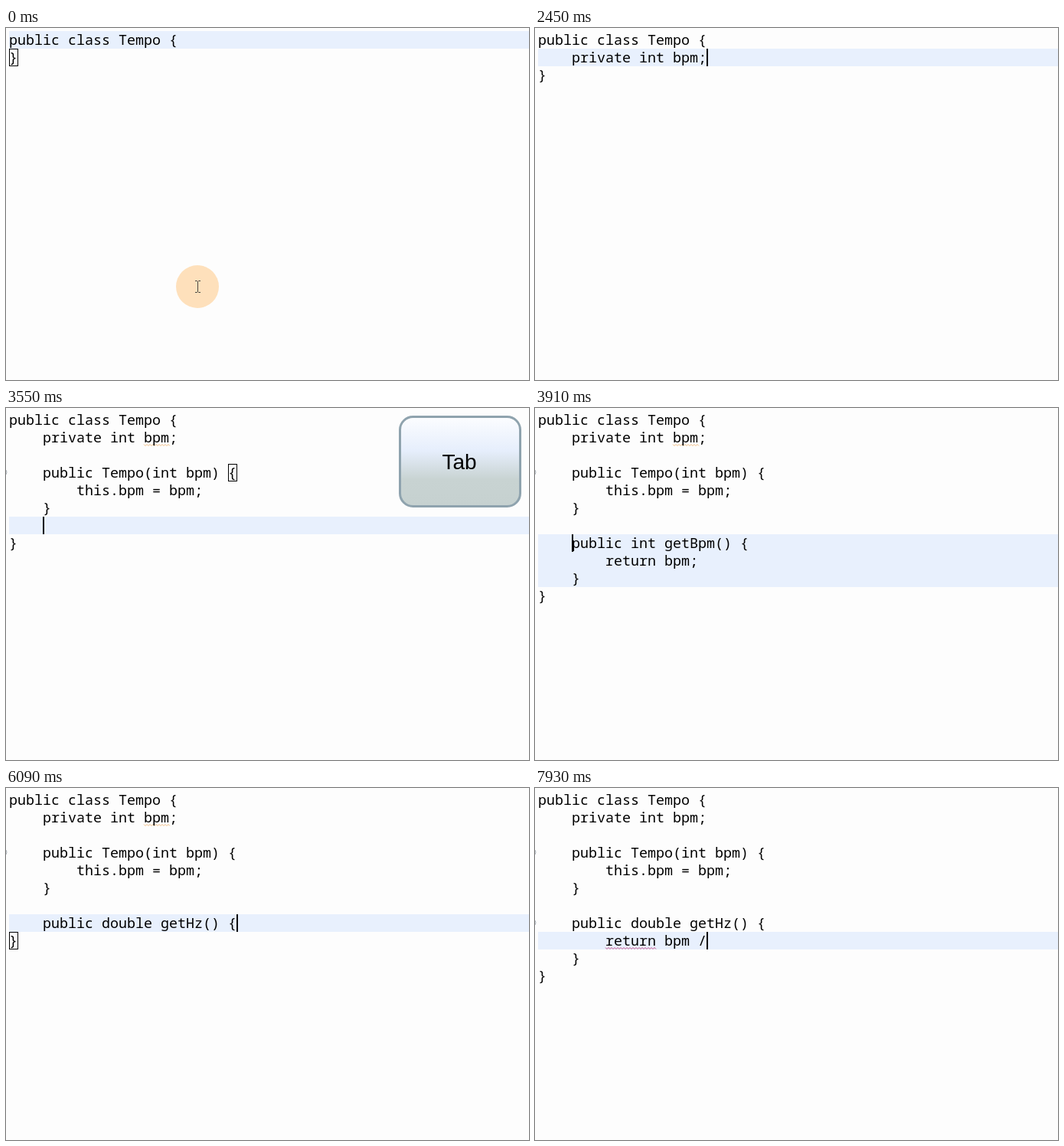
An HTML page that plays this animation: 683x460 px, repeating every 8000 ms.

```html
<!DOCTYPE html>
<html lang="en">
<head>
<meta charset="utf-8">
<title>Code completion</title>
<style>
  html, body { margin: 0; width: 100%; height: 100%; overflow: hidden; background: #fdfdfd; }
  svg { display: block; width: 683px; height: 460px; }
  .code { font: 18.3333px "Noto Sans Mono", "DejaVu Sans Mono", monospace; white-space: pre; }
  .code .key { font-weight: 700; fill: #12000a; }
  .code .field { fill: #1408c8; }
  .code .ghost { fill: #8f9ca6; }
  .key-label { font: 28px "Liberation Sans", Arial, sans-serif; text-anchor: middle; }
</style>
</head>
<body>
<svg viewBox="0 0 683 460">
  <defs>
    <linearGradient id="cap" x1="0" y1="0" x2="0" y2="1">
      <stop offset="0" stop-color="#fcfdff"/>
      <stop offset=".38" stop-color="#e6eefc"/>
      <stop offset=".7" stop-color="#c8d3d2"/>
      <stop offset="1" stop-color="#c6d1d0"/>
    </linearGradient>
  </defs>
  <g id="page"></g>
  <g id="pointer">
    <circle cx="250" cy="338" r="28" fill="#fee0bb"/>
    <path d="M247 330.5h2.5l1 1 1-1h2.5M250.5 331v14M247 345.5h2.5l1-1 1 1h2.5" fill="none" stroke="#4a4641"/>
  </g>
  <g id="keycap">
    <rect x="514.5" y="11.5" width="157" height="117" rx="17" fill="url(#cap)" stroke="#8fa3ae" stroke-width="3"/>
    <text class="key-label" x="592" y="80">Tab</text>
  </g>
</svg>
<script>
const LOOP = 8000, LEFT = 4, TOP = 4, COL = 11, ROW = 23;
const HEAD = 'public class Tempo {';
const FIELD = HEAD + '\n    private int bpm;';
const CTOR = 'public Tempo(int bpm) {\n        this.bpm = bpm;\n    }';
const MAIN = 'public static void main(String[] args) {\n    }';
const GETTER = 'public int getBpm() {\n        return bpm;\n    }';
const BUILT = FIELD + '\n\n    ' + CTOR;
const METHOD = BUILT + '\n\n    ';
const BODY = METHOD + 'public double getHz() {\n        ';

const steps = [];
// Options hold from one step to the next until they are changed.
let options = { caret: true, tail: '\n}', folds: [] };
function step(time, text, ghost = '', change = {}) {
  options = { ...options, ...change };
  steps.push({ time, text, ghost, ...options });
}
// Types a line in parts, one every 120 ms, on top of what is there.
function type(start, base, parts) {
  parts.forEach((part, i) => step(start + i * 120, base += part));
  return base;
}
// Types the first letters of a suggestion whose rest stays grey.
function suggest(start, base, full, counts) {
  counts.forEach((n, i) => step(start + i * 120, base + full.slice(0, n), full.slice(n)));
}

step(0, HEAD, '', { caret: false, pointer: true, bracket: [1, 0] });
step(120, HEAD, '', { caret: true });
step(490, HEAD, '', { caret: false });
let line = HEAD + '\n    ';
step(740, line, '', { caret: true, pointer: false, bracket: null });
suggest(990, line, MAIN, [0, 1]);
line = type(1230, line + 'p', ['r', 'i', 'v']);
line = type(1720, line, ['ate', ' i', 'nt', ' b', 'pm']);
step(2450, FIELD);

step(2700, FIELD + '\n');
step(2820, FIELD + '\n\n    ');
options = { ...options, field: true, warn: true };
suggest(2940, FIELD + '\n\n    ', CTOR, [0, 1, 2]);
step(3300, BUILT, '', { bracket: [3, 26], keycap: true, folds: [3] });
step(3550, BUILT + '\n    ');
step(3670, METHOD, '', { bracket: null });
step(3790, METHOD, '', { keycap: false });
suggest(3910, METHOD, GETTER, [0, 1]);
suggest(4400, METHOD, GETTER, [2, 3, 4, 6, 7]);
line = type(5000, METHOD + 'public ', ['d', 'ou', 'bl', 'e ', 'g']);
line = type(5730, line, ['et', 'Hz', '()']);
step(6090, line + ' {', '', { bracket: [8, 0] });
step(6340, BODY, '', { bracket: null, tail: '\n    }\n}' });
options = { ...options, warn: false, folds: [3, 7] };
line = type(6590, BODY, ['r', 'et', 'ur', 'n']);
options = { ...options, error: true };
line = type(7320, line, [' ', 'b', 'pm']);
type(7810, line, [' ', '/']);

const page = document.getElementById('page');
const pointer = document.getElementById('pointer');
const keycap = document.getElementById('keycap');
const colX = c => LEFT + c * COL;
const rowY = r => TOP + r * ROW;
const TOKEN = /\b(?:public|class|private|int|static|void|this|double|return)\b|[\w]+|[^\w\s]+/g;

function add(tag, attrs, text) {
  const node = document.createElementNS('http://www.w3.org/2000/svg', tag);
  for (const name in attrs) node.setAttribute(name, attrs[name]);
  if (text) node.textContent = text;
  page.appendChild(node);
}
const box = (x, y, width, height, more) => add('rect', { x, y, width, height, ...more });
const word = (text, col, row, kind) =>
  add('text', { x: colX(col), y: rowY(row) + 18, class: 'code ' + kind }, text);

function drawCode(text, field, row, col) {
  for (const part of text.split('\n')) {
    for (const m of part.matchAll(TOKEN)) {
      const t = m[0];
      const isKey = /^(public|class|private|int|static|void|this|double|return)$/.test(t);
      const isField = field && t === 'bpm' && (row === 1 || part.slice(0, m.index).endsWith('this.'));
      word(t, col + m.index, row, isKey ? 'key' : isField ? 'field' : '');
    }
    row++;
    col = 0;
  }
}
function drawGhost(text, row, col) {
  for (const part of text.split('\n')) {
    word(part, col, row++, 'ghost');
    col = 0;
  }
}
function wave(row, col, count, stroke) {
  const y = rowY(row) + 20.5;
  let d = `M${colX(col)} ${y}`;
  for (let i = 0; i < count * COL / 2; i++) d += `l2 ${i % 2 ? -2 : 2}`;
  add('path', { d, fill: 'none', stroke, 'stroke-width': 1 });
}

function draw(s) {
  page.replaceChildren();
  const rows = s.text.split('\n');
  const row = rows.length - 1, col = rows[row].length;
  const extra = s.ghost.split('\n').length - 1;
  box(LEFT, rowY(row), 683 - LEFT, ROW * (extra + 1), { fill: '#e8f0fd' });
  if (s.warn) wave(1, 16, 3, '#f2bd83');
  if (s.error) wave(8, 8, 6, '#c2508c');
  drawCode(s.text, s.field, 0, 0);
  if (s.ghost) drawGhost(s.ghost, row, col);
  drawCode(s.tail, false, row + extra, 0);
  for (const r of s.folds)
    add('circle', { cx: -3, cy: rowY(r) + 11, r: 4, fill: 'none', stroke: '#a4abb2' });
  if (s.bracket)
    box(colX(s.bracket[1]) + .5, rowY(s.bracket[0]) + .5, COL, ROW - 1, { fill: 'none', stroke: '#000' });
  if (s.caret) box(colX(col), rowY(row), 2, ROW, { fill: '#000' });
  pointer.style.display = s.pointer ? '' : 'none';
  keycap.style.display = s.keycap ? '' : 'none';
}

let shown;
function tick() {
  const time = performance.now() % LOOP;
  const now = steps.findLast(s => s.time <= time);
  if (now !== shown) draw(shown = now);
  requestAnimationFrame(tick);
}
tick();
</script>
</body>
</html>
```
